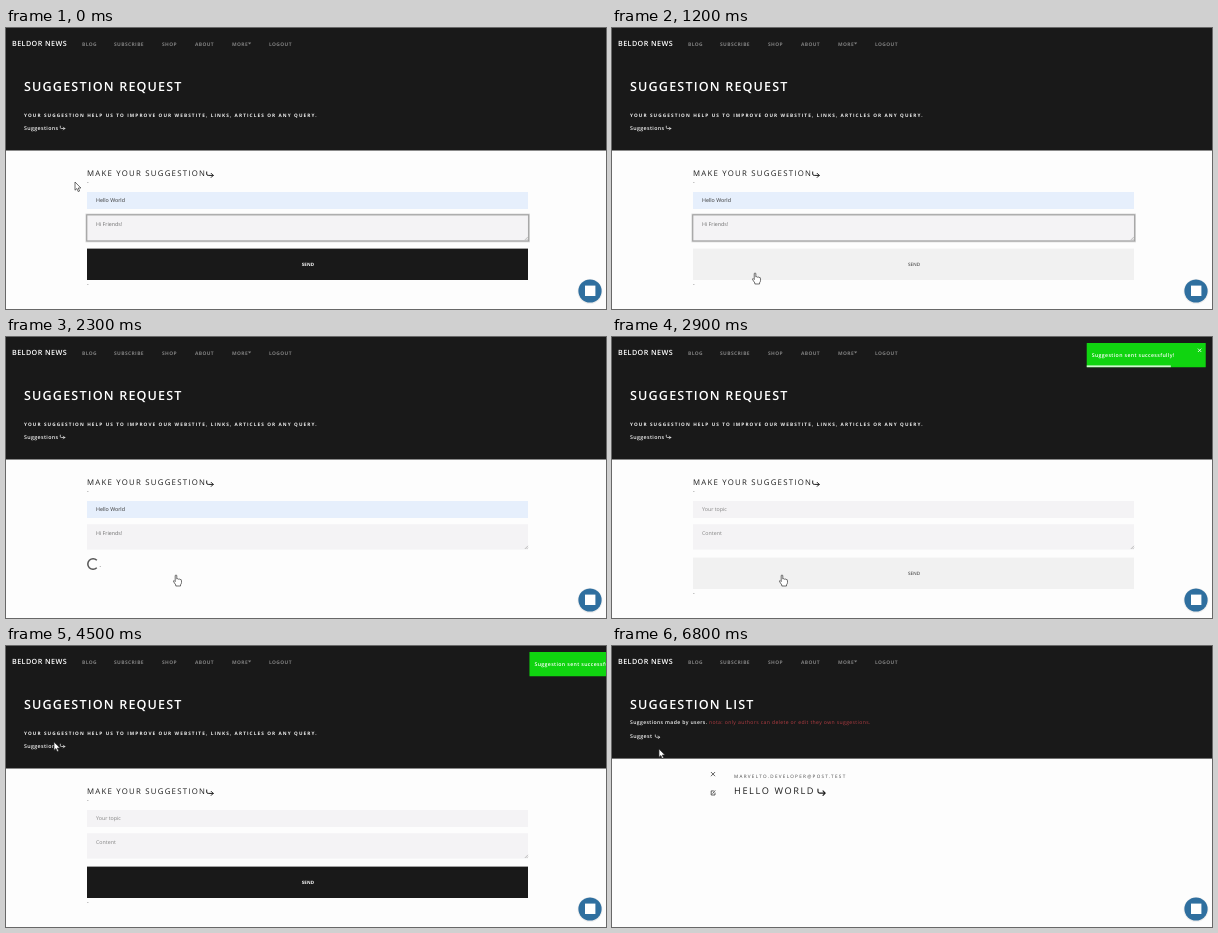
These frames come from a looping animation (600 px wide and 281 px high, 8000 ms). An HTML page:

```html
<!DOCTYPE html>
<html lang="en">
<head>
<meta charset="utf-8">
<title>Suggestion request</title>
<style>
  html, body { margin: 0; width: 100%; height: 100%; overflow: hidden; background: #fdfdfd; }
  svg { display: block; width: 100%; height: 100%; }
  text { font-family: "Open Sans", "Noto Sans", sans-serif; text-rendering: geometricPrecision; white-space: pre; }
  .brand { font-size: 7.2px; font-weight: 600; letter-spacing: .42px; fill: #fff; }
  .nav { font-size: 4.9px; font-weight: 700; letter-spacing: .4px; fill: #808080; }
  .title { font-size: 12.6px; font-weight: 600; letter-spacing: 1.15px; fill: #fff; }
  .lead { font-size: 4.7px; font-weight: 700; letter-spacing: 1.1px; fill: #f2f2f2; }
  .link { font-size: 5.3px; font-weight: 600; letter-spacing: .35px; fill: #f4f4f4; }
  .note { font-size: 5.1px; font-weight: 600; letter-spacing: .37px; fill: #f4f4f4; }
  .warn { font-weight: 400; fill: #b23c42; }
  .head { font-size: 7.8px; letter-spacing: 1.24px; fill: #1c1c1c; }
  .field { font-size: 5.3px; fill: #333; }
  .hint { fill: #858585; }
  .dash { font-size: 5px; fill: #444; }
  .send { font-size: 4.5px; font-weight: 700; letter-spacing: .15px; text-anchor: middle; }
  .toast { font-size: 5.2px; font-weight: 600; letter-spacing: .37px; fill: #fff; }
  .mail { font-size: 4.6px; letter-spacing: 1.3px; fill: #444; }
  .item { font-size: 9.2px; letter-spacing: 1.6px; fill: #1c1c1c; }
  .line { fill: none; stroke-linecap: round; stroke-linejoin: round; }
</style>
</head>
<body>
<svg viewBox="0 0 600 281" preserveAspectRatio="none">
  <defs>
    <path id="turn" class="line" d="M.5 .5V2.6Q.5 4 2 4H7M5 2L7 4L5 6"/>
  </defs>
  <rect width="600" height="281" fill="#fdfdfd"/>
  <rect id="banner" width="600" height="122.5" fill="#191919"/>
  <text class="brand" x="6" y="18.2">BELDOR NEWS</text>
  <g id="menu"></g>
  <path d="M242 14.6h3.2l-1.6 1.8z" fill="#808080"/>

  <g id="request">
    <text class="title" x="18" y="63">SUGGESTION REQUEST</text>
    <text class="lead" x="18" y="88.6">YOUR SUGGESTION HELP US TO IMPROVE OUR WEBSTITE, LINKS, ARTICLES OR ANY QUERY.</text>
    <text class="link" id="link" x="18" y="101.6">Suggestions</text>
    <use href="#turn" transform="translate(54 97.8) scale(.68)" stroke="#fff" stroke-width="1"/>
    <text class="head" x="81" y="148.4">MAKE YOUR SUGGESTION</text>
    <use href="#turn" transform="translate(200.2 143.4)" stroke="#1c1c1c" stroke-width="1"/>
    <text class="dash" x="81" y="156">-</text>
    <rect id="topicBox" x="81" y="164" width="441" height="17"/>
    <text id="topic" x="90" y="174.2"></text>
    <rect x="81" y="187.3" width="441" height="25.3" fill="#f4f3f5"/>
    <path d="M518.8 212L522 208.8M520.6 212L522 210.6" stroke="#888" stroke-width=".5"/>
    <g id="focus" fill="none">
      <rect x="80.5" y="186.6" width="442.4" height="26.7" stroke="#d4d4d4" stroke-width="2"/>
      <rect x="80.7" y="186.8" width="442" height="26.2" stroke="#9a9a9a" stroke-width=".9"/>
    </g>
    <text id="content" x="90" y="198"></text>
    <rect id="caret" x="116" y="192.4" width=".6" height="7.2" fill="#333"/>
    <g id="button">
      <rect id="face" x="81" y="220.6" width="441" height="31.4"/>
      <text class="send" id="label" x="302" y="238.2">SEND</text>
      <text class="dash" x="81" y="258.4">-</text>
    </g>
    <g id="loader">
      <path id="ring" class="line" style="stroke-linecap:butt" d="M90.8 223.2A5.3 5.3 0 1 0 90.8 230.8" stroke="#555" stroke-width="1.5"/>
      <text class="dash" x="93.6" y="231.4">-</text>
    </g>
  </g>

  <g id="list">
    <text class="title" x="18" y="63">SUGGESTION LIST</text>
    <text class="note" x="18" y="78">Suggestions made by users.</text>
    <text class="note warn" x="97" y="78">nota: only authors can delete or edit they own suggestions.</text>
    <text class="link" x="18" y="92">Suggest</text>
    <use href="#turn" transform="translate(43 88.6) scale(.66)" stroke="#fff" stroke-width="1"/>
    <g id="entry">
      <path class="line" d="M99.2 126.3l3.6 3.6m0-3.6l-3.6 3.6" stroke="#222" stroke-width=".7"/>
      <path class="line" d="M101.4 144.9H99.2V149H103V147M100.8 147.4L103 144.7" stroke="#222" stroke-width=".7"/>
      <text class="mail" x="122" y="132.2">MARVELTO.DEVELOPER@POST.TEST</text>
      <text class="item" x="122" y="148.4">HELLO WORLD</text>
      <use href="#turn" transform="translate(205.4 142.6) scale(1.12)" stroke="#1c1c1c" stroke-width="1"/>
    </g>
  </g>

  <circle cx="584" cy="263.4" r="12.4" fill="#000" opacity=".07"/>
  <circle cx="584" cy="263" r="11.6" fill="#2f6f9f"/>
  <rect x="579" y="257.6" width="10.4" height="10.4" fill="#fff"/>

  <g id="toast">
    <rect x="476" y="6" width="119" height="24.2" rx=".5" fill="#10d410"/>
    <text class="toast" x="481" y="20">Suggestion sent successfully!</text>
    <path d="M587.2 11.6l3.4 3.4m0-3.4l-3.4 3.4" stroke="#fff" stroke-width=".8"/>
    <rect id="bar" x="476" y="28.4" height="1.8" fill="#fff" opacity=".8"/>
  </g>

  <g id="cursor" stroke="#333" stroke-width=".7" stroke-linejoin="round">
    <path id="arrow" fill="#fff" d="M0 0V8.2L1.9 6.5L3.2 9.6L4.6 9L3.3 6H5.9Z"/>
    <path id="hand" fill="#fff" d="M-.8 .9Q-.8 0 0 0T.8 .9V4Q1.6 3.3 2.4 4.2Q3.3 3.6 4 4.5Q5.6 4.2 5.5 5.8V7.4Q5.4 9 4.5 9.8V11H-.2V10L-2.4 6.7Q-2.8 5.6-1.8 5.6L-.8 6.6Z"/>
    <path id="beam" fill="none" d="M-1.5 -4.5H1.5M0 -4.5V4.5M-1.5 4.5H1.5"/>
  </g>
</svg>
<script>
const LOOP = 8000;
const $ = Object.fromEntries([...document.querySelectorAll('[id]')].map(el => [el.id, el]));

const MENU = { BLOG: 76, SUBSCRIBE: 108, SHOP: 156, ABOUT: 189, MORE: 226, LOGOUT: 263 };
$.menu.innerHTML = Object.entries(MENU)
  .map(([word, x]) => `<text class="nav" x="${x}" y="17.8">${word}</text>`).join('');

const clamp = v => Math.min(1, Math.max(0, v));
const ramp = (t, a, b) => clamp((t - a) / (b - a));
const mix = (a, b, k) => a + (b - a) * k;
const show = (el, on) => el.setAttribute('display', on ? 'inline' : 'none');
const grey = v => `rgb(${[v, v, v].map(Math.round)})`;

// CSS cubic-bezier timing solved by bisection
function bezier(x1, y1, x2, y2) {
  const at = (a, b, s) => 3 * a * s * (1 - s) ** 2 + 3 * b * s * s * (1 - s) + s ** 3;
  return x => {
    let lo = 0, hi = 1;
    for (let i = 0; i < 20; i++) {
      const mid = (lo + hi) / 2;
      if (at(x1, x2, mid) < x) lo = mid; else hi = mid;
    }
    return at(y1, y2, lo);
  };
}
const ease = bezier(.25, .1, .25, 1);
const bounce = bezier(.215, .61, .355, 1);
const linear = k => k;

// keys: [time, value, ...], eased between neighbours
function track(keys, t, curve = linear) {
  if (t <= keys[0][0]) return keys[0].slice(1);
  for (let i = 1; i < keys.length; i++) {
    const a = keys[i - 1], b = keys[i];
    if (t < b[0]) {
      const k = curve((t - a[0]) / (b[0] - a[0]));
      return a.slice(1).map((v, j) => mix(v, b[j + 1], k));
    }
  }
  return keys[keys.length - 1].slice(1);
}

const PATH = [
  [0, 69, 154], [499, 69, 154], [500, 100, 204], [950, 100, 204], [1200, 143, 245],
  [1800, 170, 238], [2950, 170, 238], [3800, 43, 186], [4500, 48, 96], [4750, 48, 96],
  [4900, 49, 98], [5499, 49, 98], [5500, 44, 99], [5950, 44, 99], [6800, 47, 103]
];

const TOAST_IN = 2320, TOAST_OUT = 4300, PX = .372;
const ENTER = [[0, 3000], [.6, -25], [.75, 10], [.9, -5], [1, 0]];
const LEAVE = [[0, 0], [.2, -20], [1, 2000]];

function drawCursor(t) {
  const [x, y] = track(PATH, t);
  const inside = (top, bottom) => x > 81 && x < 522 && y > top && y < bottom;
  const form = t < 5500;
  const hand = form && (inside(220, 252) || t >= 4800);
  const beam = form && !hand && (inside(164, 181) || inside(187, 213));
  $.cursor.setAttribute('transform', `translate(${x} ${y})`);
  show($.hand, hand);
  show($.beam, beam);
  show($.arrow, !hand && !beam);
}

function drawForm(t) {
  const filled = t < TOAST_IN, busy = t >= 2100 && filled;
  const focused = t < 2100;
  $.topicBox.setAttribute('fill', filled ? '#e6effc' : '#f4f3f5');
  $.topic.textContent = filled ? 'Hello World' : 'Your topic';
  $.topic.setAttribute('class', filled ? 'field' : 'field hint');
  $.content.textContent = filled ? 'Hi Friends!' : 'Content';
  $.content.setAttribute('class', 'field hint');
  $.content.style.fill = filled ? '#6e6e6e' : '';
  show($.focus, focused);
  show($.caret, focused && ((t >= 200 && t < 800) || (t >= 1300 && t < 1800)));

  const hover = ease(ramp(t, 1030, 1180)) - ease(ramp(t, 3280, 3430));
  $.face.setAttribute('fill', grey(mix(25, 241, hover)));
  $.label.setAttribute('fill', grey(mix(255, 30, hover)));
  $.label.style.fontWeight = hover > .5 ? 500 : 700;
  show($.button, !busy);
  show($.loader, busy);
  $.ring.setAttribute('transform', `rotate(${(t - 2300) / 750 * 360} 87 227)`);
  $.link.style.fill = t >= 4800 ? '#d0d0d0' : '';
}

function drawToast(t) {
  const [shift] = t < TOAST_OUT
    ? track(ENTER, (t - TOAST_IN) / 700, bounce)
    : track(LEAVE, (t - TOAST_OUT) / 750, ease);
  show($.toast, t >= TOAST_IN && t < TOAST_OUT + 750);
  $.toast.setAttribute('transform', `translate(${shift * PX} 0)`);
  $.bar.setAttribute('width', 119 * (1 - ramp(t, TOAST_IN, TOAST_OUT)));
}

function draw(t) {
  const list = t >= 5500;
  $.banner.setAttribute('height', list ? 112.6 : 122.5);
  show($.request, !list);
  show($.list, list);
  show($.entry, t >= 6000);
  drawForm(t);
  drawToast(t);
  drawCursor(t);
}

const start = performance.now();
function tick() {
  draw((performance.now() - start) % LOOP);
  requestAnimationFrame(tick);
}
tick();
</script>
</body>
</html>
```
